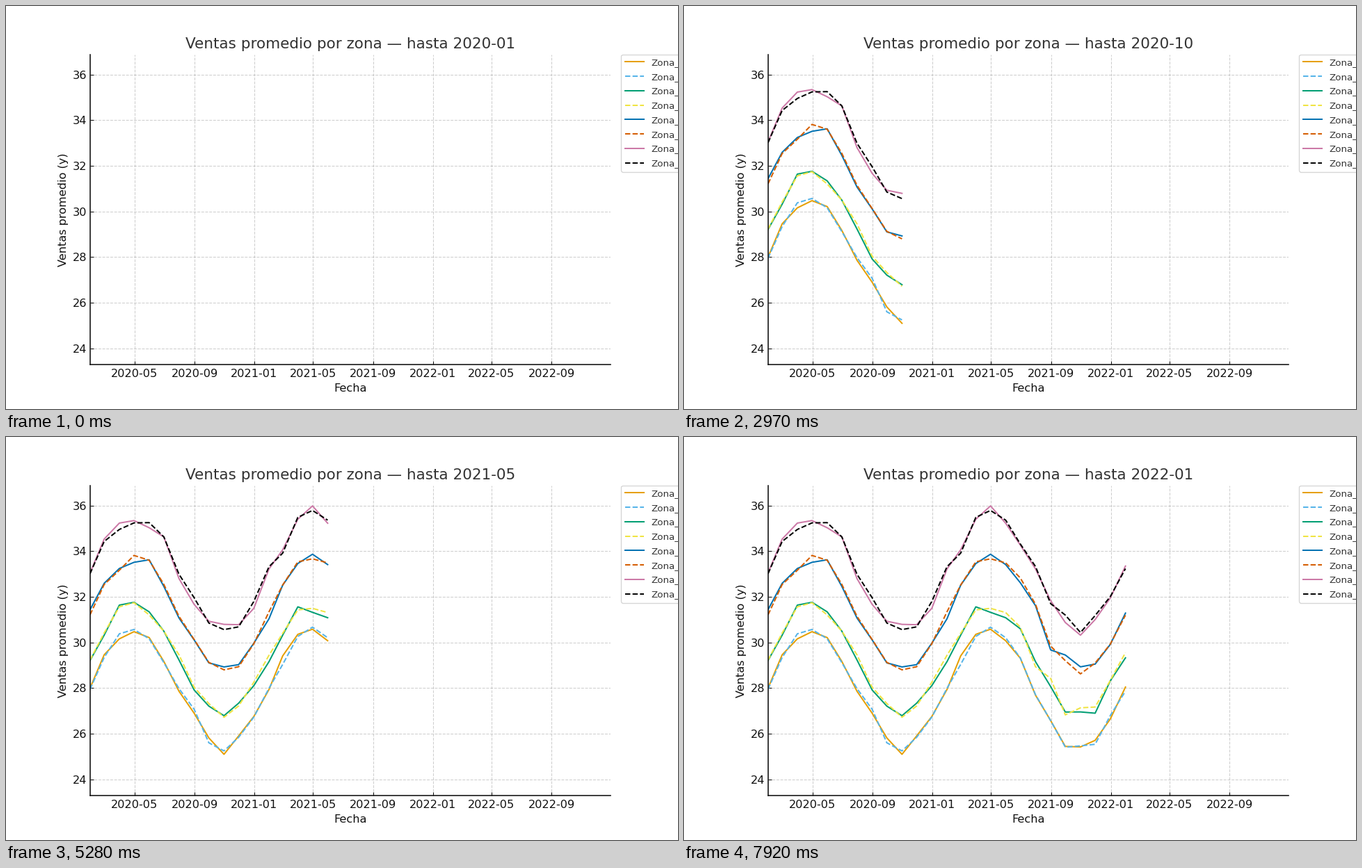
Animation of 966 by 580 pixels, one loop 8000 ms. Source, as a matplotlib script:

```python
import numpy as np
import matplotlib.pyplot as plt
from matplotlib.animation import FuncAnimation

LOOP, HOLD, TICK = 8000, 330, 40   # ms
K = 0.966                          # scale of a 10 x 6 inch layout

plt.rcParams.update({
    "font.family": "DejaVu Sans",
    "text.color": "#333333",
    "axes.titlesize": 16 * K,
    "axes.titlepad": 6.7 * K,
    "axes.labelsize": 12 * K,
    "axes.labelpad": 4 * K,
    "axes.labelcolor": "#111111",
    "axes.edgecolor": "#111111",
    "axes.linewidth": 1.2 * K,
    "axes.spines.top": False,
    "axes.spines.right": False,
    "legend.fontsize": 10 * K,
    "legend.labelspacing": 0.578,
    "lines.linewidth": 1.5 * K,
    "grid.color": "#b0b0b0",
    "grid.linestyle": "--",
    "grid.linewidth": 0.8 * K,
    "grid.alpha": 0.6,
})
for side, pad in (("xtick", 4), ("ytick", 3.5)):
    plt.rcParams.update({
        f"{side}.direction": "in",
        f"{side}.labelsize": 12 * K,
        f"{side}.color": "#111111",
        f"{side}.major.size": 3.5 * K,
        f"{side}.major.pad": pad * K,
        f"{side}.major.width": 0.8 * K,
    })

COLORS = ("#E69F00", "#56B4E9", "#009E73", "#F0E442",
          "#0072B2", "#D55E00", "#CC79A7", "#000000")
# mean level and seasonal swing, each shared by two neighbouring zones
SEASONS = ((28.00, 2.62), (29.31, 2.39), (31.31, 2.54), (33.07, 2.41))


def days(dates):
    return dates.astype("datetime64[D]").astype(float)


months = np.arange("2020-01", "2023-01", dtype="datetime64[M]")
ends = days(months + 1) - 1        # last day of each month
season = np.sin(2 * np.pi * np.arange(len(months)) / 12)
rng = np.random.default_rng(7)

fig, ax = plt.subplots(figsize=(9.66, 5.8), dpi=100, facecolor="white")
fig.subplots_adjust(left=0.125, right=0.9, bottom=0.11, top=0.88)

zones = []
for pair, (level, swing) in enumerate(SEASONS):
    trend = level + swing * season + rng.normal(0, 0.15, len(months))
    for n, style in ((2 * pair, "-"), (2 * pair + 1, "--")):
        sales = trend + rng.normal(0, 0.12, len(months))
        line, = ax.plot([], [], style, color=COLORS[n], label=f"Zona_{n + 1}")
        zones.append((line, sales))

marks = months[4::4]
ax.set_xticks(days(marks), [str(m) for m in marks])
ax.set_yticks(range(24, 37, 2))
ax.set_xlim(ends[0], ends[-1])
ax.set_ylim(23.29, 36.88)
ax.set_xlabel("Fecha", labelpad=5 * K)
ax.set_ylabel("Ventas promedio (y)")
ax.grid(True)
ax.legend(loc="upper left", bbox_to_anchor=(1.02, 1), borderaxespad=0)
title = ax.set_title("")


def update(i):
    # a change that falls inside a tick shows from that tick's start
    step = (i * TICK + TICK - 1) // HOLD
    for line, sales in zones:
        line.set_data(ends[:step + 1], sales[:step + 1])
    title.set_text(f"Ventas promedio por zona — hasta {months[step]}")
    return [title] + [line for line, _ in zones]


anim = FuncAnimation(fig, update, frames=LOOP // TICK, interval=TICK,
                     init_func=lambda: update(0), repeat=True, repeat_delay=0)
plt.show()
```
